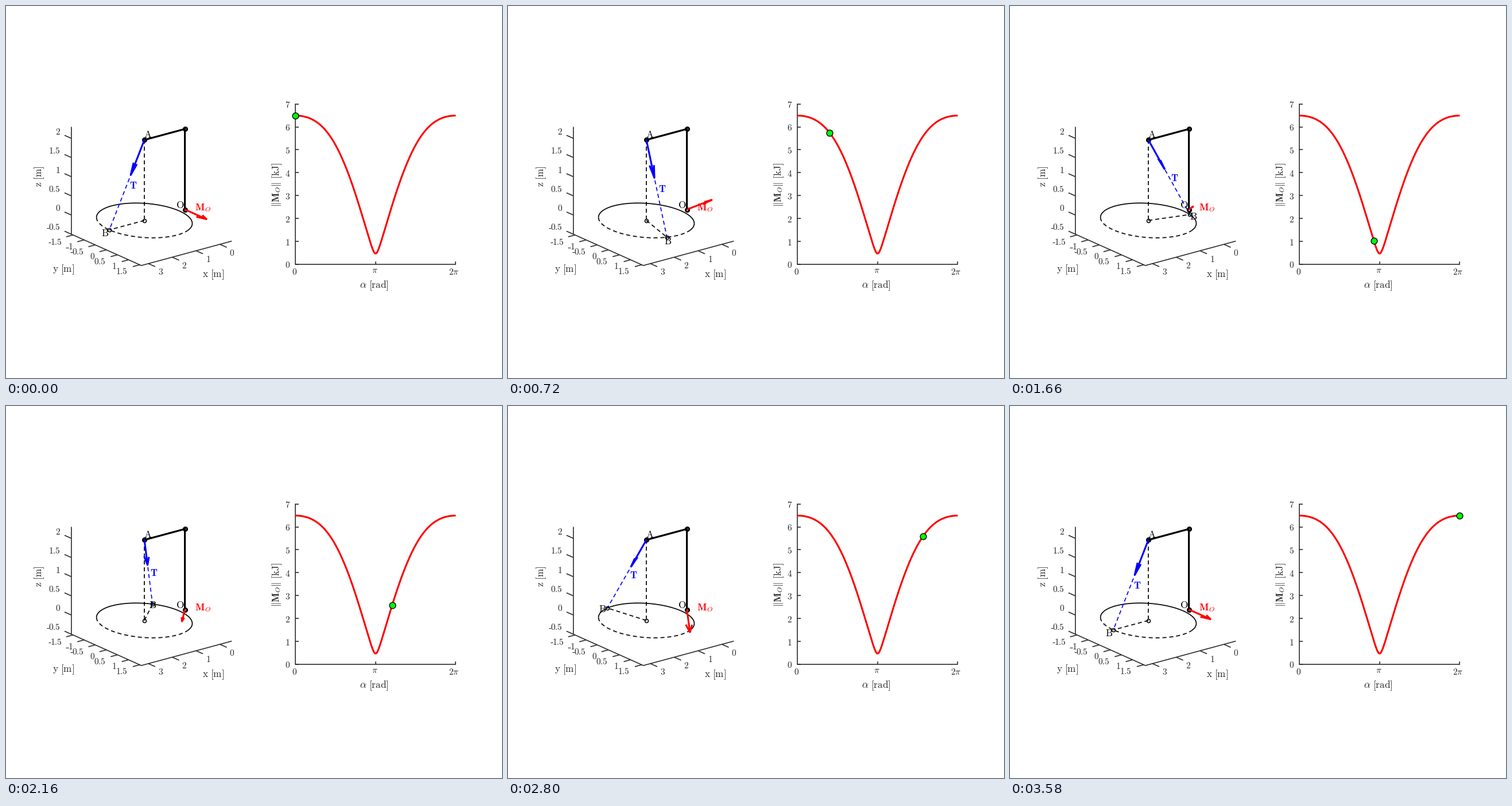
Animation of 864x648 px, one loop 3.6 s. Source, as a matplotlib script:

```python
import numpy as np
import matplotlib.pyplot as plt
from matplotlib.animation import FuncAnimation

W, H, DPI = 864, 648, 100
FRAMES, STEP = 180, 20
PX = 72 / DPI  # points per pixel

GRAY = (0.15, 0.15, 0.15)
TICK, LABEL = 15.3, 17.2  # text sizes in pixels

plt.rcParams["mathtext.fontset"] = "cm"
fig = plt.figure(figsize=(W / DPI, H / DPI), dpi=DPI, facecolor="white")
ax = fig.add_axes([0, 0, 1, 1])
ax.set_xlim(0, W)
ax.set_ylim(H, 0)
ax.axis("off")

# Projection of the 3D scene to pixels
ORIGIN = np.array([311.6, 354.5])
BASIS = np.array([[-41.5, 11.2], [38.7, 17.3], [0, -66.8]])

# Crane: arm length, cable circle radius, mast height, cable tension
ARM, R, MAST, TENSION = 1.7, 1.47, 2.1, 2.5
A = np.array([ARM, 0, MAST])
FOOT = np.array([ARM, 0, 0])
CABLE = np.hypot(R, MAST)
M_SCALE = 0.15

# Limits of the 3D box
X0, X1, Y0, Y1, Z0, Z1 = -0.5, 3.295, -1.575, 1.575, -0.5, 2.3


def project(p):
    return ORIGIN + np.asarray(p, float) @ BASIS


def line(pts, color="k", width=1.7, dashed=False, z=2, join="round", cap="butt"):
    pts = np.asarray(pts, float)
    style = (0, (7 / width, 5 / width)) if dashed else "-"
    return ax.plot(pts[:, 0], pts[:, 1], color=color, lw=width * PX, ls=style, zorder=z,
                   solid_joinstyle=join, solid_capstyle=cap, dash_capstyle="butt")[0]


def ring(p, size=6, edge=1.6, face="none", z=4):
    return ax.plot([p[0]], [p[1]], "o", ms=size * PX, mfc=face, mec="k",
                   mew=edge * PX, zorder=z)[0]


def text(x, y, s, size=LABEL, color=GRAY, ha="center", rot=0, z=6):
    return ax.text(x, y, f"${s}$", fontsize=size * PX, color=color, ha=ha, va="baseline",
                   rotation=rot, rotation_mode="anchor", zorder=z)


def number(x, y, value):
    """Right-aligned tick number, centred on y, with a short hyphen as its sign."""
    s = f"{abs(value):g}"
    base = y + 5
    text(x, base, rf"\mathrm{{{s}}}", TICK, ha="right")
    if value < 0:
        left = x - TICK * (1.278 if "." in s else 0.5)
        y_sign = base - 0.216 * TICK
        line([(left - 0.32 * TICK, y_sign), (left - 0.05 * TICK, y_sign)], GRAY, 1.1)


def circle(a):
    a = np.asarray(a, float)
    return np.stack([ARM + R * np.cos(a), R * np.sin(a), 0 * a], axis=-1)


def moment(a):
    b = circle(a)
    return np.cross(b, (b - A) * TENSION / CABLE)


def arrow_points(start, vec):
    """Shaft and head; the barbs spread in the horizontal plane."""
    tip = start + vec
    side = 0.13 * np.array([-vec[1], vec[0], 0])
    back = tip - 0.33 * vec
    return project([start, tip]), project([back + side, tip, back - side])


# 3D axes
line(project([(X1, Y0, Z1), (X1, Y0, Z0), (X1, Y1, Z0), (X0, Y1, Z0)]), GRAY, 1.6, join="miter")
for i in range(4):
    p = project((i, Y1, Z0))
    line([p, p + (12, 5.3)], GRAY, 1.6)
    number(397.8 - 41.4 * i, 430 + 11 * i, i)
for i in range(7):
    y = -1.5 + 0.5 * i
    p = project((X1, y, Z0))
    line([p, p + (-12, 3.2)], GRAY, 1.6)
    number(98 + 19 * i, 410.5 + 8.6 * i, y)
for i in range(6):
    z = -0.5 + 0.5 * i
    p = project((X1, Y0, z))
    line([p, p + (-12, -5.3)], GRAY, 1.6)
    number(95, 385.5 - 33.3 * i, z)
text(361, 472, r"\mathrm{x\ [m]}")
text(100, 463, r"\mathrm{y\ [m]}")
text(62.5, 297, r"\mathrm{z\ [m]}", rot=90)

# Fixed parts of the crane
line(project(circle(np.linspace(1.95, 2 * np.pi - 0.75, 150))))
line(project(circle(np.linspace(-0.75, 1.95, 150))), dashed=True)
line(project([A, FOOT]), dashed=True)
line(project([(0, 0, 0), (0, 0, MAST), A]), width=3.2, z=3)
for joint in [(0, 0, 0), (0, 0, MAST), A]:
    ring(project(joint), 6, 3.1)
ring(project(FOOT))
text(247, 228.8, r"\mathrm{A}", color="k")
text(303, 351.8, r"\mathrm{O}", color="k")
text(329, 356.5, r"\mathbf{M}_O", color="red", ha="left")

# Moment plot
LEFT, RIGHT, TOP, BOTTOM = 504.2, 783.4, 170.6, 450.0


def plot_point(a):
    size = np.linalg.norm(moment(a), axis=-1)
    return np.stack([LEFT + (RIGHT - LEFT) * a / (2 * np.pi),
                     BOTTOM - (BOTTOM - TOP) * size / 7], axis=-1)


line([(LEFT, TOP), (LEFT, BOTTOM), (RIGHT, BOTTOM)], GRAY, 1.6, join="miter", cap="projecting")
for i in range(8):
    y = BOTTOM - (BOTTOM - TOP) * i / 7
    line([(LEFT, y), (LEFT + 5.5, y)], GRAY, 1.6)
    number(495, y + 1.5, i)
for x in ((LEFT + RIGHT) / 2, RIGHT):
    line([(x, BOTTOM), (x, BOTTOM - 5.5)], GRAY, 1.6)
text(503, 468.3, r"\mathrm{0}", TICK)
text(642, 465.5, r"\pi", TICK)
text(780.5, 468.3, r"\mathrm{2}\pi", TICK)
text(641, 491, r"\alpha\ \mathrm{[rad]}")
text(476, 311.5, r"\|\mathbf{M}_O\|\ \mathrm{[kJ]}", rot=90)
line(plot_point(np.linspace(0, 2 * np.pi, 400)), "red", 3.1, z=3)

# Moving parts
START = [(0, 0), (0, 0)]
radius = line(START, dashed=True)
cable = line(START, "blue", dashed=True, z=3)
t_arrow = [line(START, "blue", 3.1, z=5) for _ in range(2)]
m_arrow = [line(START, "red", 3.1, z=5) for _ in range(2)]
b_ring = ring((0, 0))
b_text = text(0, 0, r"\mathrm{B}", color="k")
t_text = text(0, 0, r"\mathbf{T}", color="blue")
dot = ring((0, 0), 10.8, 1.4, face=(0, 1, 0), z=7)


def place(item, pts):
    item.set_data(*np.atleast_2d(pts).T)


def draw(frame):
    a = 2 * np.pi * frame / (FRAMES - 1)
    b = circle(a)
    a_px, b_px, foot_px = project(A), project(b), project(FOOT)
    place(radius, [foot_px, b_px])
    place(cable, [a_px, b_px])
    place(b_ring, b_px)
    place(dot, plot_point(a))
    for parts, start, vec in ((t_arrow, A, (b - A) / CABLE),
                              (m_arrow, np.zeros(3), M_SCALE * moment(a))):
        for part, pts in zip(parts, arrow_points(start, vec)):
            place(part, pts)
    b_text.set_position(b_px + 0.1 * (b_px - foot_px) + (-1.4, 9.5))
    t_text.set_position(a_px + 0.485 * (b_px - a_px) + (10.1, 9.0))
    return [radius, cable, *t_arrow, *m_arrow, b_ring, b_text, t_text, dot]


anim = FuncAnimation(fig, draw, frames=FRAMES, interval=STEP, repeat=True,
                     repeat_delay=0, blit=False)
plt.show()
```
